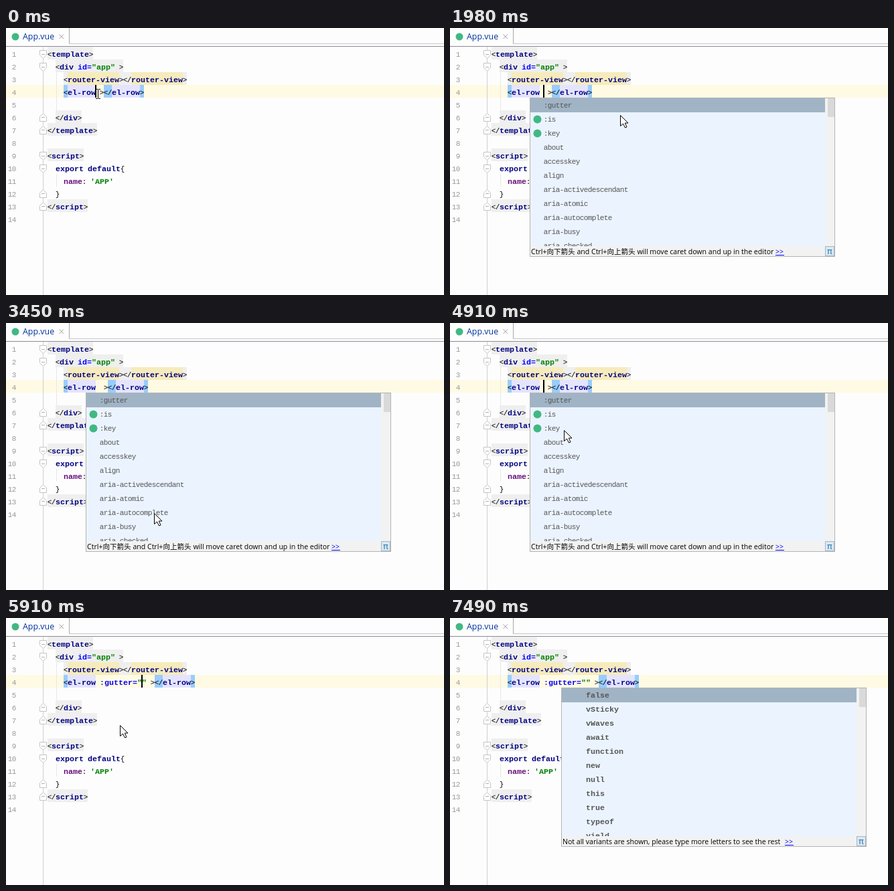
Animation of 654 by 399 pixels, one loop 7.74 s. Source, as an HTML page with a canvas:

```html
<!DOCTYPE html>
<html lang="en">
<head>
<meta charset="utf-8">
<title>Editor completion</title>
<style>
html, body { margin: 0; width: 100%; height: 100%; overflow: hidden; background: #fdfdfd; }
canvas { display: block; }
</style>
</head>
<body>
<canvas id="stage" width="654" height="399"></canvas>
<script>
const ctx = document.getElementById('stage').getContext('2d');
const LOOP = 7740, ROW = 19, ITEM = 21;
const UI = '"Open Sans", "Noto Sans CJK SC", sans-serif';
const MONO = '"Liberation Mono", monospace';
const GREY = '#efefef', USED = '#f6ebbc', NAME = '#e4e4ff', BRACKET = '#99ccff';
const STYLES = {
  plain: ['#000', false], tag: ['#000080', true], attr: ['#0000ff', true],
  value: ['#008000', true], prop: ['#660e7a', true]
};
const ATTRIBUTES = [':gutter', ':is', ':key', 'about', 'accesskey', 'align',
  'aria-activedescendant', 'aria-atomic', 'aria-autocomplete', 'aria-busy', 'aria-checked'];
const VALUES = ['false', 'vSticky', 'vWaves', 'await', 'function', 'new', 'null',
  'this', 'true', 'typeof', 'yield'];

// Times at which the caret turns off and on again, alternately.
const BLINKS = [1480, 1980, 2490, 2970, 3450, 3930, 4410, 4910, 5410, 5910, 6400, 6890, 7490];

// Pointer keys: time, x, y.
const BROWSE = [[1980, 254, 130], [2130, 258, 133], [2250, 259, 141], [2490, 250, 168],
  [2850, 225, 215], [3450, 221, 284], [3690, 221, 296], [3930, 231, 279], [4410, 179, 189]];
const RETURN = [[4550, 176, 180], [4910, 170, 160]];
const LEAVE = [[6530, 170, 160], [6650, 160, 184], [6770, 157, 214], [6890, 186, 260],
  [7010, 262, 310], [7130, 360, 346], [7250, 456, 371], [7370, 535, 392]];

const rowTop = row => 28 + ROW * (row - 1);

function box(x, y, w, h, color) {
  ctx.fillStyle = color;
  ctx.fillRect(x, y, w, h);
}

function frame(x, y, w, h, color) {
  ctx.strokeStyle = color;
  ctx.strokeRect(x + .5, y + .5, w - 1, h - 1);
}

function poly(points, fill, stroke) {
  ctx.beginPath();
  points.forEach(([x, y]) => ctx.lineTo(x, y));
  ctx.closePath();
  ctx.fillStyle = fill;
  ctx.fill();
  ctx.strokeStyle = stroke;
  ctx.stroke();
}

function dot(x, y, r, color) {
  ctx.fillStyle = color;
  ctx.beginPath();
  ctx.arc(x, y, r, 0, 7);
  ctx.fill();
}

function label(text, x, y, size, color, family = UI) {
  ctx.textAlign = 'left';
  ctx.font = `${size}px ${family}`;
  ctx.fillStyle = color;
  ctx.fillText(text, x, y);
}

// Fixed pitch: 6 px for regular characters, 7 px for bold ones.
function mono(text, x, y, color, bold) {
  const pitch = bold ? 7 : 6;
  ctx.textAlign = 'center';
  ctx.font = (bold ? 'bold 11.67px ' : '11px ') + MONO;
  ctx.fillStyle = color;
  for (const char of text) {
    ctx.fillText(char, x + pitch / 2, y);
    x += pitch;
  }
  return x;
}

// Each part is [text, style, background].
function code(row, x, parts) {
  const top = rowTop(row);
  for (const [text, style, back] of parts) {
    const [color, bold] = STYLES[style];
    if (back) box(x, top, text.length * (bold ? 7 : 6), ROW, back);
    x = mono(text, x, top + 15, color, bold);
  }
}

function tag(row, x, open, name, nameBack = GREY) {
  code(row, x, [[open, 'plain', GREY], [name, 'tag', nameBack], ['>', 'plain', GREY]]);
}

function foldMark(row, dir) {
  const y = rowTop(row) + (dir > 0 ? 11 : 10);
  const point = (x, dy) => [x, y + .5 + dy * dir];
  poly([point(50.5, -6), point(60.5, -6), point(60.5, 1), point(55.5, 6), point(50.5, 1)],
    '#fff', '#c4c4c4');
  box(53, y, 5, 1, '#b0b0b0');
}

function header() {
  box(94, 0, 1, 24, '#a8a8a8');
  box(94, 23, 560, 1, '#c4c4cc');
  box(0, 27, 654, 1, '#8c8c94');
  dot(14, 13, 5.5, '#41b883');
  label('App.vue', 25, 17, 12.4, '#0032a0');
  ctx.strokeStyle = '#a0a0a0';
  ctx.beginPath();
  ctx.moveTo(79.5, 9.5); ctx.lineTo(86, 16);
  ctx.moveTo(86, 9.5); ctx.lineTo(79.5, 16);
  ctx.stroke();
}

function editor(attribute) {
  box(0, rowTop(4), 654, ROW, '#fffae3');
  box(55, 28, 1, 371, '#d0d0d0');
  box(75, rowTop(3), 1, ROW * 3, '#e8e8e8');
  box(75, rowTop(11), 1, ROW, '#e8e8e8');
  for (let row = 1; row <= 14; row++) mono(String(row), row < 10 ? 9 : 3, rowTop(row) + 15, '#999');

  tag(1, 62, '<', 'template');
  code(2, 74, [['<', 'plain', GREY], ['div', 'tag', GREY], [' ', 'plain', GREY],
    ['id=', 'attr', GREY], ['"app"', 'value', GREY], [' >', 'plain', GREY]]);
  tag(3, 86, '<', 'router-view', USED);
  tag(3, 175, '</', 'router-view', USED);
  code(4, 86, [['<', 'plain', BRACKET], ['el-row', 'tag', NAME], ...attribute, [' >', 'plain'],
    ['</', 'plain', BRACKET], ['el-row', 'tag', NAME], ['>', 'plain', BRACKET]]);
  tag(6, 74, '</', 'div');
  tag(7, 62, '</', 'template');
  tag(9, 62, '<', 'script');
  code(10, 74, [['export', 'tag'], [' ', 'plain'], ['default', 'tag'], ['{', 'plain']]);
  code(11, 86, [['name', 'prop'], [': ', 'plain'], ["'APP'", 'value']]);
  code(12, 74, [['}', 'plain']]);
  tag(13, 62, '</', 'script');

  [1, 2, 9, 10].forEach(row => foldMark(row, 1));
  [6, 7, 12, 13].forEach(row => foldMark(row, -1));
}

function popup(x, items, { textX, bold, focused, selected, hint, linkX, icon }) {
  box(x, 104, 456, 238, '#f2f2f2');
  box(x + 1, 105, 440, 221, '#ebf4fe');
  box(x + 445, 105, 10, 28, '#d9d9d9');
  frame(x, 104, 456, 238, '#b4b4b4');

  ctx.save();
  ctx.beginPath();
  ctx.rect(x + 1, 105, 440, 221);
  ctx.clip();
  items.forEach((item, i) => {
    const top = 105 + ITEM * i, active = i === selected;
    if (active) box(x + 1, top, 440, ITEM, focused ? '#0052a4' : '#a0b4c5');
    if (icon && (i === 1 || i === 2)) icon(x, top);
    mono(item, textX, top + 14, !focused ? '#555' : active ? '#fff' : '#000', bold);
  });
  ctx.restore();

  label(hint, x + 2, 338, 10.57, '#000');
  label('>>', linkX, 338, 10.57, '#0000ff');
  box(linkX, 339, 13, 1, '#0000ff');
  box(x + 441, 326, 14, 15, '#dce8f2');
  frame(x + 441, 326, 14, 15, '#a4b8c8');
  label('π', x + 444, 338, 13, '#2f7fb5', '"DejaVu Sans", sans-serif');
}

const componentIcon = (x, top) => dot(x + 11.5, top + 10.5, 6, '#41b883');

function scriptIcon(x, top) {
  box(x + 10, top + 3, 6, 9, '#c3ccd3');
  box(x + 6, top + 7, 4, 5, '#c3ccd3');
  box(x + 4, top + 12, 15, 8, '#f4c98d');
  label('JS', x + 5, top + 19, 8, '#80561f', '"Liberation Sans", sans-serif');
}

function arrow(x, y) {
  const shape = [[0, 0], [0, 16], [4, 12.5], [7, 18.5], [9.5, 17.5], [6.8, 11.5], [11.5, 11.5]];
  poly(shape.map(([dx, dy]) => [x + .5 + dx, y + .5 + dy]), '#fff', '#000');
}

function textCursor(x, y) {
  box(x - 1, y - 6, 1, 13, '#000');
  for (const end of [y - 7, y + 7]) {
    box(x - 4, end, 3, 1, '#000');
    box(x, end, 3, 1, '#000');
  }
}

// The pointer is sampled every 120 ms.
function along(keys, t, start) {
  const time = start + Math.floor((t - start) / 120) * 120;
  if (time <= keys[0][0]) return keys[0].slice(1);
  const i = keys.findIndex(key => key[0] >= time);
  if (i < 0) return keys[keys.length - 1].slice(1);
  const [t0, x0, y0] = keys[i - 1], [t1, x1, y1] = keys[i];
  const k = (time - t0) / (t1 - t0);
  return [Math.round(x0 + (x1 - x0) * k), Math.round(y0 + (y1 - y0) * k)];
}

function pointer(t) {
  if (t < 610) return textCursor(...along([[0, 138, 98], [240, 250, 131]], t, 0));
  if (t < 1980 || t >= 7490) return;
  if (t < 4550) return arrow(...along(BROWSE, t, 2130));
  if (t < 6650) return arrow(...along(RETURN, t, 4550));
  const [x, y] = along(LEAVE, t, 6650);
  (x < 166 || y > 341 ? textCursor : arrow)(x, y);
}

function draw(t) {
  box(0, 0, 654, 399, '#fdfdfd');

  const inserted = t >= 5910, spaced = t >= 610;
  editor(inserted ? [[' ', 'plain'], [':gutter=', 'attr'], ['""', 'value']]
    : spaced ? [[' ', 'plain']] : []);
  header();
  if (BLINKS.filter(time => time <= t).length % 2 === 0)
    box(inserted ? 202 : spaced ? 139 : 133, 85, 2, ROW, '#000');

  if (t >= 730 && !inserted) popup(119, ATTRIBUTES, {
    textX: 140, focused: t >= 5410, selected: t >= 5410 && t < 5660 ? 1 : 0,
    hint: 'Ctrl+向下箭头 and Ctrl+向上箭头 will move caret down and up in the editor',
    linkX: 486, icon: componentIcon
  });
  if (t >= 6030) popup(166, VALUES, {
    textX: 203, bold: true, selected: 0,
    hint: 'Not all variants are shown, please type more letters to see the rest',
    linkX: 500, icon: t < 6150 && scriptIcon
  });
  pointer(t);
}

const begin = performance.now();
function tick() {
  draw((performance.now() - begin) % LOOP);
  requestAnimationFrame(tick);
}
tick();
</script>
</body>
</html>
```
